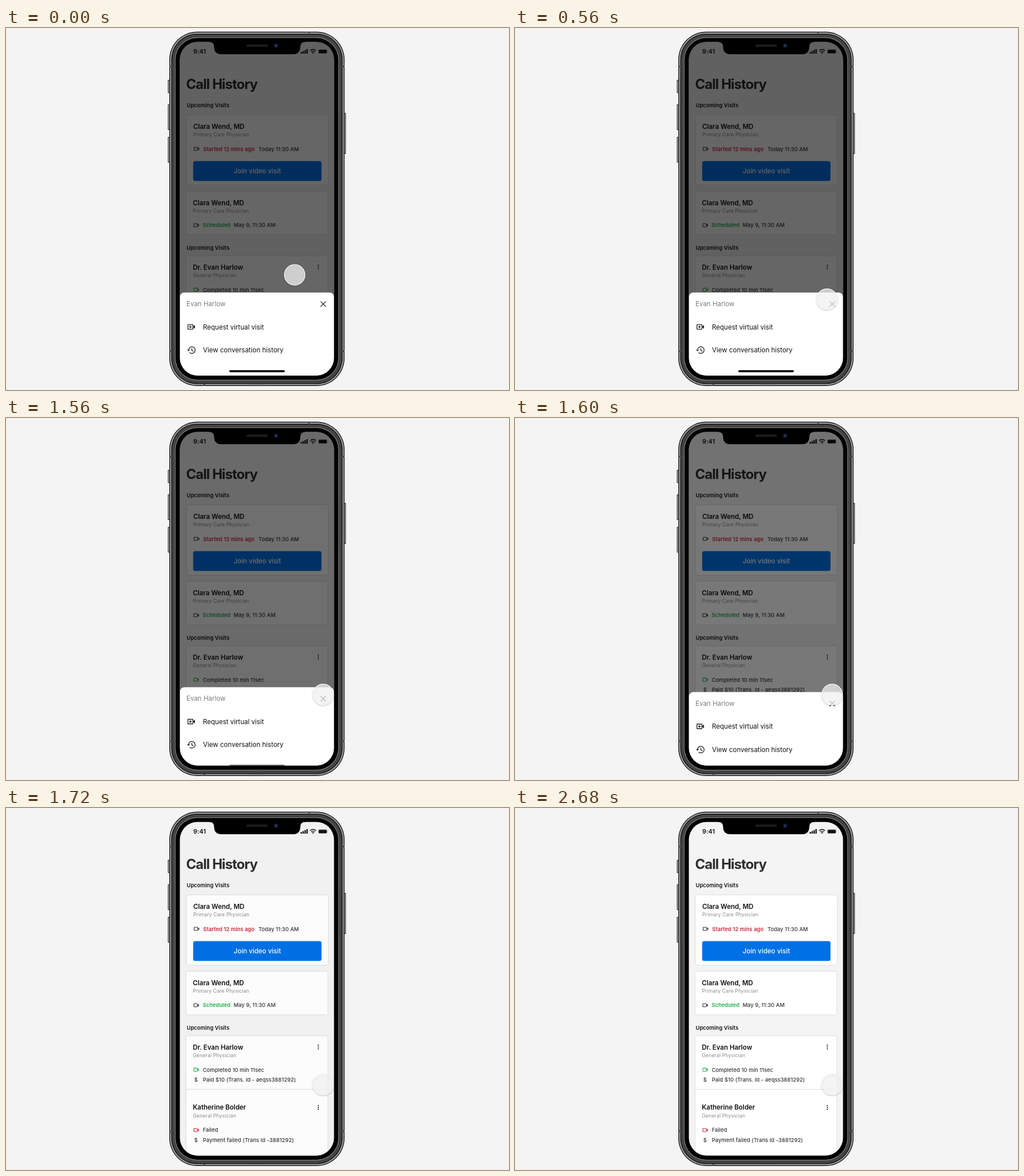
Write an HTML page that moves like this. It is 881 by 635 pixels and loops after 2720 ms.

```html
<!DOCTYPE html>
<html lang="en">
<head>
<meta charset="utf-8">
<title>Call history</title>
<style>
  html, body { margin: 0; width: 100%; height: 100%; overflow: hidden; background: #f4f4f4; }
  svg { display: block; width: 881px; height: 635px; }
  text { font: 500 9.36px Inter, sans-serif; letter-spacing: .07px; fill: #333; }
  .title { font-size: 24px; font-weight: 700; letter-spacing: -.95px; fill: #2d2d2d; }
  .head { font-weight: 600; fill: #111; }
  .name { font-size: 11.52px; font-weight: 600; letter-spacing: 0; fill: #111; }
  .role { font-size: 8.7px; font-weight: 400; letter-spacing: .14px; fill: #8b8b8b; }
  .row { font-size: 11.52px; font-weight: 400; letter-spacing: .02px; fill: #111; }
  .red { font-weight: 600; fill: #cf2638; }
  .green { font-weight: 600; fill: #20ad4c; }
  .card { fill: #fff; filter: drop-shadow(0 .8px 1px #0003); }
  .line { fill: none; stroke: #222; stroke-width: 1.3; }
</style>
</head>
<body>
<svg viewBox="0 0 881 635">
  <defs>
    <clipPath id="screen"><rect x="304.5" y="24.5" width="270" height="585" rx="31"/></clipPath>
    <g id="camera" fill="none" stroke="currentColor" stroke-width="1.1">
      <rect x="-4.2" y="-2.8" width="6.2" height="5.6" rx=".6"/>
      <path d="M2.4-.6 4.6-2.4V2.4L2.4.6Z" fill="currentColor" stroke="none"/>
    </g>
    <g id="dots" fill="#222"><circle cy="-3.2" r="1.05"/><circle r="1.05"/><circle cy="3.2" r="1.05"/></g>
  </defs>

  <g id="frame"></g>

  <g clip-path="url(#screen)">
    <rect x="304" y="24" width="271" height="586" fill="#f4f4f4"/>
    <text x="328" y="45" style="font-size:10.8px;font-weight:600;fill:#111">9:41</text>
    <g fill="#111">
      <path d="M516 42h2.3v3h-2.3zM519.4 40.5h2.3V45h-2.3zM522.8 38.7h2.3V45h-2.3zM526.2 37h2.3v8h-2.3z"/>
      <path d="M537.8 45.2l-1.8-2q1.8-1.4 3.6 0z"/>
      <path d="M532.6 39.8q5.2-4.4 10.4 0M534.4 42q3.4-2.8 6.8 0" fill="none" stroke="#111" stroke-width="1.4"/>
      <rect x="547" y="37.5" width="15.5" height="7.6" rx="2" opacity=".45"/>
      <rect x="548" y="38.5" width="13.5" height="5.6" rx="1.2"/>
      <path d="M563 40q1.4 1.2 0 2.6z" opacity=".5"/>
    </g>

    <text class="title" x="315.5" y="107">Call History</text>
    <text class="head" x="316.5" y="139.3">Upcoming Visits</text>

    <rect class="card" x="316.5" y="153" width="247.5" height="122" rx="3"/>
    <text class="name" x="328" y="176.7">Clara Wend, MD</text>
    <text class="role" x="328" y="190.3">Primary Care Physician</text>
    <use href="#camera" x="333.8" y="212" color="#333"/>
    <text class="red" x="345.3" y="215.5">Started 12 mins ago</text>
    <text x="442.3" y="215.5">Today 11:30 AM</text>
    <rect x="327.8" y="233.4" width="224.8" height="34.8" rx="3.5" fill="#0070e6"/>
    <text class="row" x="440.2" y="255.2" text-anchor="middle" style="fill:#fff;font-weight:500">Join video visit</text>

    <rect class="card" x="316" y="287" width="247.3" height="75.3" rx="3"/>
    <text class="name" x="327.3" y="310.6">Clara Wend, MD</text>
    <text class="role" x="327.3" y="324.3">Primary Care Physician</text>
    <use href="#camera" x="333.2" y="346" color="#333"/>
    <text class="green" x="344.5" y="349.4">Scheduled</text>
    <text x="398.7" y="349.4">May 9, 11:30 AM</text>

    <text class="head" x="316.5" y="389.3">Upcoming Visits</text>
    <rect class="card" x="316" y="400.3" width="247.3" height="230" rx="3"/>
    <path d="M316 493.7h247.3" stroke="#e4e4e4" stroke-width="1.3"/>

    <text class="name" x="327.2" y="423.6">Dr. Evan Harlow</text>
    <text class="role" x="327.2" y="437.4">General Physician</text>
    <use href="#dots" x="547" y="419.3"/>
    <use href="#camera" x="333.2" y="459.2" color="#20ad4c"/>
    <text x="344.7" y="462.6">Completed 10 min 11sec</text>
    <text x="329.8" y="480">$</text>
    <text x="344.7" y="479.9">Paid $10 (Trans. Id - aeqss3881292)</text>

    <text class="name" x="327.2" y="529.4">Katherine Bolder</text>
    <text class="role" x="327.2" y="543.4">General Physician</text>
    <use href="#dots" x="547" y="525.2"/>
    <use href="#camera" x="333.2" y="565" color="#cf2638"/>
    <text x="344.7" y="568.4">Failed</text>
    <text x="329.8" y="585.8">$</text>
    <text x="344.7" y="585.7">Payment failed (Trans Id -3881292)</text>

    <rect id="dim" x="304" y="24" width="271" height="586"/>

    <g id="sheet">
      <rect x="304.5" y="464" width="270" height="170" rx="8" fill="#fff"/>
      <text class="row" x="316" y="488.2" style="fill:#7d7d7d">Evan Harlow</text>
      <path class="line" d="M551 479.6l9.2 9.2m0-9.2l-9.2 9.2"/>
      <g class="line">
        <rect x="318.6" y="520.3" width="8.8" height="8" rx=".6"/>
        <path d="M323 522v4.6m-2.3-2.3h4.6"/>
        <path d="M328 523.6l3-2.8v7l-3-2.8z" fill="#222" stroke="none"/>
      </g>
      <text class="row" x="345" y="528.7">Request virtual visit</text>
      <g class="line">
        <path d="M319.7 565a5.8 5.8 0 1 1 1.8 4.2M325.5 561.7v3.8l2.8 1.7"/>
        <path d="M317 564.4h5.2l-2.6 2.7z" fill="#222" stroke="none"/>
      </g>
      <text class="row" x="345" y="569.2">View conversation history</text>
      <rect x="391" y="600.2" width="97.5" height="3.6" rx="1.8"/>
    </g>
  </g>

  <path d="M356 20v4.5q8.5 0 8.5 8.5 0 13 13 13h125q13 0 13-13 0-8.5 8.5-8.5V20z"/>
  <rect x="421" y="28.8" width="37.5" height="4.4" rx="2.2" fill="#1b1b1b"/>
  <circle cx="473" cy="31" r="4.2" fill="#10131d"/>
  <circle cx="473" cy="31" r="2.2" fill="#1d3a66"/>

  <g id="touch">
    <circle r="18" fill="none" stroke="#fff" stroke-width="1.3" style="filter:drop-shadow(0 1.4px 1px #0005)"/>
    <circle r="18" fill="#f0f0f0" fill-opacity=".75"/>
  </g>
</svg>

<script>
const get = id => document.getElementById(id);
const rect = (x, y, w, h, r, fill) =>
  `<rect x="${x}" y="${y}" width="${w}" height="${h}" rx="${r}" fill="${fill}"/>`;

// Side buttons, nested rims from the outside in, then antenna bands.
const buttons = [[283.5, 91, 23], [283.5, 134, 45], [283.5, 191, 45], [583.3, 149, 72]];
const rims = [[0, '#1a1a1a'], [1.4, '#a6a6a6'], [3.4, '#1c1c1c'], [5.2, '#474747'],
  [8, '#3a3a3a'], [9.6, '#777'], [11, '#000']];
const bands = [[286, 66, 5, 3], [588, 66, 5, 3], [286, 565.5, 5, 3], [588, 565.5, 5, 3],
  [529.5, 7, 3, 4], [346, 624, 3, 4]];

get('frame').innerHTML =
  buttons.map(([x, y, h]) => rect(x, y, 12, h, 1.2, '#222') + rect(x + .9, y + 1, 10.2, h - 2, .8, '#999')).join('') +
  rims.map(([d, fill]) => rect(286 + d, 6.5 + d, 307 - 2 * d, 621.5 - 2 * d, 49 - d, fill)).join('') +
  bands.map(([x, y, w, h]) => rect(x, y, w, h, 0, '#4a4a4a')).join('') +
  rect(427, 625.4, 27, 1.4, .7, '#777');

const LOOP = 2720, TOUCH_END = 1120, SHEET_END = 1722, SHEET_HEIGHT = 145;

function draw(now) {
  const t = now % LOOP;
  const reach = 1 - Math.max(0, 1 - t / TOUCH_END) ** 2.45;
  const closed = Math.min(1, Math.exp((t - SHEET_END) / 56));
  get('touch').setAttribute('transform', `translate(${505.5 + 50 * reach} ${433 + 52 * reach})`);
  get('sheet').setAttribute('transform', `translate(0 ${SHEET_HEIGHT * closed})`);
  get('sheet').setAttribute('visibility', closed < 1 ? 'visible' : 'hidden');
  get('dim').setAttribute('opacity', .6 * (1 - closed));
}

const start = performance.now();
function tick() {
  draw(performance.now() - start);
  requestAnimationFrame(tick);
}
tick();
</script>
</body>
</html>
```
